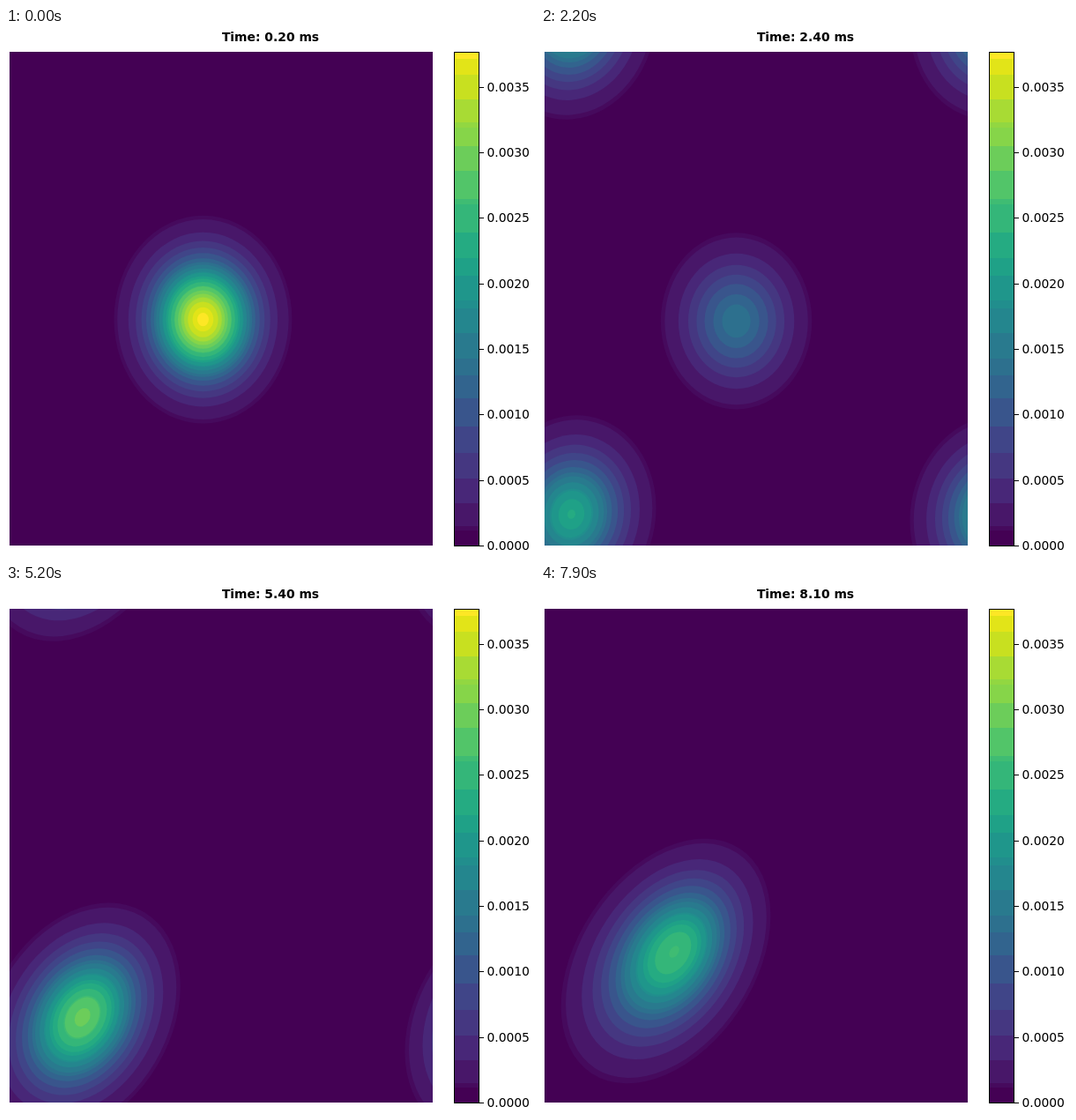
Write an HTML page with a canvas that moves like this. It is 600 px wide and 600 px high and loops after 8000 ms.

```html
<!DOCTYPE html>
<html lang="en">
<head>
<meta charset="utf-8">
<title>Density over time</title>
<style>
html, body { margin: 0; width: 100%; height: 100%; overflow: hidden; background: #fff; }
canvas, svg { position: absolute; left: 0; top: 0; width: 600px; height: 600px; }
text { font: 13.89px "DejaVu Sans", sans-serif; fill: #000; }
#title { font-weight: bold; text-anchor: middle; }
</style>
</head>
<body>
<canvas id="field" width="600" height="600"></canvas>
<svg id="labels" viewBox="0 0 600 600"><text id="title" x="300" y="15"></text></svg>
<script>
const LOOP = 8000, STEP = 100;
const PLOT = { x: 4, y: 27, w: 480, h: 560 };
const BAR = { x: 508, w: 28 };
const BOTTOM = PLOT.y + PLOT.h;
const SIGMA = { x: 38.2, y: 44.6 };
const RABI = 0.38;

// lower edge of each colour band on the bar, and its colour
const BANDS = [
  [587, '#440154'], [570, '#460a5d'], [565, '#481769'], [539, '#482778'],
  [511, '#453781'], [482, '#404588'], [452, '#39558c'], [420, '#32648e'],
  [394, '#2d708e'], [375, '#297a8e'], [346, '#24868e'], [318, '#218e8d'],
  [309, '#1f968b'], [281, '#1fa187'], [261, '#25ab82'], [232, '#34b679'],
  [200, '#3fbc73'], [194, '#52c569'], [162, '#6ccd5a'], [134, '#86d549'],
  [113, '#92d741'], [107, '#a8db34'], [81, '#c8e020'], [53, '#e2e418'],
  [35, '#fde725']
].map(([y, color]) => ({ y, color, level: (BOTTOM - y) / PLOT.h }));

// time, width, correlation, skew of the moving cloud
const SHAPE = [
  [0.2, 38.2, 0, 0], [1.6, 38.2, 0.02, 0], [3.2, 40.8, 0.11, 0],
  [4.5, 43, 0.2, 0], [5.4, 44.3, 0.28, 0.7], [6.7, 46.6, 0.33, 2],
  [8.1, 47.5, 0.37, 4]
];

const ctx = document.getElementById('field').getContext('2d');
const svg = document.getElementById('labels');
const title = document.getElementById('title');

function shapeAt(t) {
  let i = 1;
  while (i < SHAPE.length - 1 && t > SHAPE[i][0]) i++;
  const a = SHAPE[i - 1], b = SHAPE[i];
  const k = (t - a[0]) / (b[0] - a[0]);
  return a.map((v, j) => v + (b[j] - v) * k);
}

function restCloud(t) {
  const c = Math.cos(Math.min(RABI * t, Math.PI / 2));
  return {
    x: 223.6 - 0.85 * t, y: 330.4 + 0.85 * t,
    sx: SIGMA.x, sy: SIGMA.y, corr: 0, skew: 0,
    amp: c * c / Math.cos(RABI * 0.2) ** 2
  };
}

function movingCloud(t) {
  const [, sx, corr, skew] = shapeAt(t);
  const sy = sx * SIGMA.y / SIGMA.x;
  const s = Math.sin(Math.min(RABI * t, Math.PI / 2));
  const u = t - 1.6, bend = u * (u - 2.9);
  return {
    x: 24 + 15.52 * u + 1.139 * bend,
    y: 564 - 18.28 * u - 1.268 * bend,
    sx, sy, corr, skew,
    amp: s * s * SIGMA.x * SIGMA.y / (sx * sy * Math.sqrt(1 - corr * corr))
  };
}

function fillContour(c, level) {
  if (c.amp <= level) return;
  const r = Math.sqrt(2 * Math.log(c.amp / level));
  ctx.save();
  ctx.transform(c.sx, -c.corr * c.sy, 0, Math.sqrt(1 - c.corr * c.corr) * c.sy,
    c.x - c.skew * r, c.y + 1.1 * c.skew * r);
  ctx.beginPath();
  ctx.arc(0, 0, r, 0, 2 * Math.PI);
  ctx.fill();
  ctx.restore();
}

function drawField(t) {
  const m = movingCloud(t);
  const clouds = [restCloud(t)];
  for (const dx of [0, PLOT.w])
    for (const dy of [0, -PLOT.h]) clouds.push({ ...m, x: m.x + dx, y: m.y + dy });

  ctx.save();
  ctx.beginPath();
  ctx.rect(PLOT.x, PLOT.y, PLOT.w, PLOT.h);
  ctx.clip();
  ctx.fillStyle = BANDS[0].color;
  ctx.fillRect(PLOT.x, PLOT.y, PLOT.w, PLOT.h);
  for (const { level, color } of BANDS.slice(1)) {
    ctx.fillStyle = color;
    for (const c of clouds) fillContour(c, level);
  }
  ctx.restore();
}

function drawBar() {
  for (const { y, color } of BANDS) {
    ctx.fillStyle = color;
    ctx.fillRect(BAR.x, PLOT.y, BAR.w, y - PLOT.y);
  }
  ctx.strokeStyle = '#000';
  ctx.lineWidth = 1;
  ctx.strokeRect(BAR.x + 0.5, PLOT.y + 0.5, BAR.w, PLOT.h);
  for (let i = 0; i < 8; i++) {
    const y = Math.round(587 - 74.32 * i);
    ctx.fillStyle = '#000';
    ctx.fillRect(BAR.x + BAR.w + 1, y, 5, 1);
    const label = document.createElementNS(svg.namespaceURI, 'text');
    label.setAttribute('x', 545.4);
    label.setAttribute('y', y + 5.4);
    label.textContent = (i * 0.0005).toFixed(4);
    svg.append(label);
  }
}

let shown = -1;
function tick() {
  const step = Math.floor(performance.now() % LOOP / STEP);
  if (step !== shown) {
    shown = step;
    const t = 0.2 + step * 0.1;
    drawField(t);
    title.textContent = `Time: ${t.toFixed(2)} ms`;
  }
  requestAnimationFrame(tick);
}

drawBar();
tick();
</script>
</body>
</html>
```
